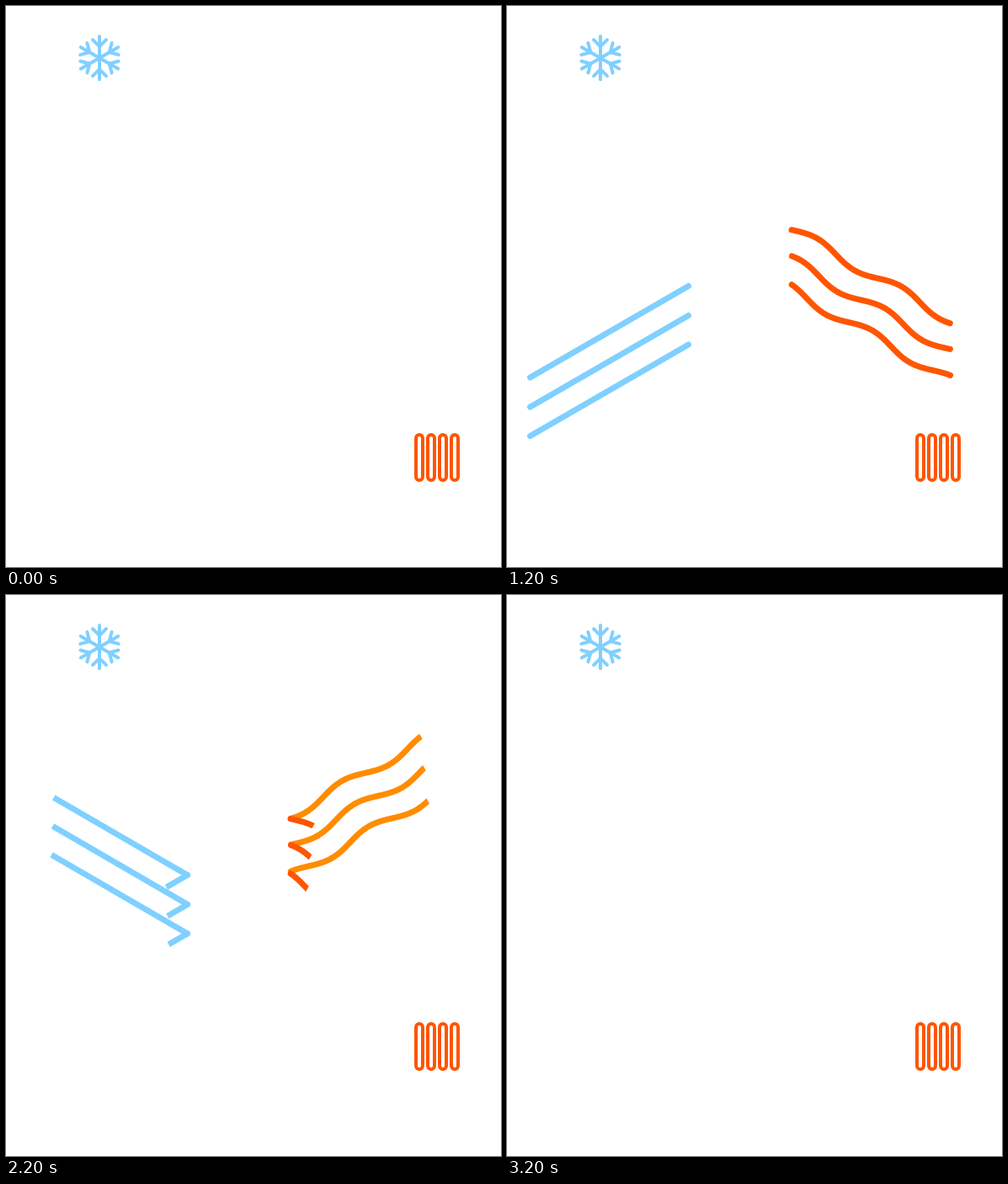
Animation of 588x666 px, one loop 3700 ms. Source, as an HTML page with a canvas:

```html
<!DOCTYPE html>
<html lang="en">
<head>
<meta charset="utf-8">
<title>Cold and warm air</title>
<style>
  html, body { margin: 0; width: 100%; height: 100%; overflow: hidden; background: #fff; }
  canvas { display: block; }
</style>
</head>
<body>
<canvas id="stage" width="588" height="666"></canvas>
<script>
const ctx = document.getElementById('stage').getContext('2d');
const LOOP = 3700, STEP = 100;
const BLUE = '#80d0ff', RED = '#ff5500', ORANGE = '#ff8c00';

const straight = (x1, y1, x2, y2) => [[x1, y1], [x2, y2]];

// Sine wave along a sloped axis; slope is 1 (falls to the right) or -1 (rises).
function wave(cx, cy, slope) {
  const angle = Math.atan(0.57), c = Math.cos(angle), s = Math.sin(angle);
  const points = [];
  for (let u = -100; u < 230; u += 0.5) {
    const w = 5.5 * Math.sin(2 * Math.PI * u / 115.2);
    const x = cx + u * c - w * s;
    if (x >= 338 && x <= 526.7) points.push([x, cy + slope * (u * s + w * c)]);
  }
  return points;
}

// Wipes: start time, duration, first offset, offset added per line, distance.
const groups = [
  {
    color: BLUE,
    lines: [441, 476, 510.5].map(y => straight(27.5, y, 215.5, y - 108.5)),
    show: [0, 1200, -7.5, 1.15, 231],
    hide: [1200, 1200, -5.2, 1.6, 232]
  },
  {
    color: BLUE,
    lines: [332.5, 367.2, 402].map(y => straight(215.5, y, 27.5, y - 109)),
    show: [1200, 1200, -10.7, 1.6, 233],
    hide: [2400, 800, -5.2, 1.5, 231]
  },
  {
    color: ORANGE,
    lines: [wave(377, 239.7, -1), wave(392, 267, -1), wave(409, 293.5, -1)],
    show: [1200, 1200, -15.5, 0, 238],
    hide: [2400, 800, -7.5, 0, 235]
  },
  {
    color: RED,
    lines: [wave(390.5, 294.8, 1), wave(370.5, 320.5, 1), wave(356, 347, 1)].map(p => p.reverse()),
    show: [0, 1200, -12.3, 0, 236],
    hide: [1200, 1200, -5, 0, 235]
  }
];

function edge([start, span, offset, stagger, distance], i, t) {
  const p = Math.min((t - start) / span, 1);
  return p <= 0 ? -20 : offset + stagger * i + distance * p;
}

function trace(points) {
  ctx.beginPath();
  points.forEach(([x, y]) => ctx.lineTo(x, y));
  ctx.stroke();
}

function drawGroup({ color, lines, show, hide }, t) {
  ctx.strokeStyle = color;
  ctx.lineWidth = 7;
  lines.forEach((points, i) => {
    const from = edge(hide, i, t), to = edge(show, i, t);
    if (to <= from) return;
    const [x, y] = points[0], [ex, ey] = points[points.length - 1];
    const angle = Math.atan2(ey - y, ex - x);
    ctx.save();
    ctx.translate(x, y);
    ctx.rotate(angle);
    ctx.beginPath();
    ctx.rect(from, -40, to - from, 80);
    ctx.clip();
    ctx.rotate(-angle);
    ctx.translate(-x, -y);
    trace(points);
    ctx.restore();
  });
}

function drawSnowflake() {
  ctx.strokeStyle = BLUE;
  ctx.lineWidth = 4;
  ctx.save();
  ctx.translate(111, 61.7);
  for (let i = 0; i < 6; i++) {
    trace([[0, 0], [0, -25.6]]);
    trace([[-8, -21.5], [0, -13.5], [8, -21.5]]);
    ctx.rotate(Math.PI / 3);
  }
  ctx.restore();
}

function drawRadiator() {
  ctx.strokeStyle = RED;
  ctx.lineWidth = 4;
  for (let i = 0; i < 4; i++) {
    ctx.beginPath();
    ctx.roundRect(487 + 14 * i, 509, 8, 54, 4);
    ctx.stroke();
  }
}

function render(t) {
  ctx.fillStyle = '#fff';
  ctx.fillRect(0, 0, 588, 666);
  ctx.lineCap = ctx.lineJoin = 'round';
  drawSnowflake();
  drawRadiator();
  groups.forEach(group => drawGroup(group, t));
}

const begin = performance.now();
function tick() {
  const t = (performance.now() - begin) % LOOP;
  render(Math.floor(t / STEP) * STEP);
  requestAnimationFrame(tick);
}
tick();
</script>
</body>
</html>
```
